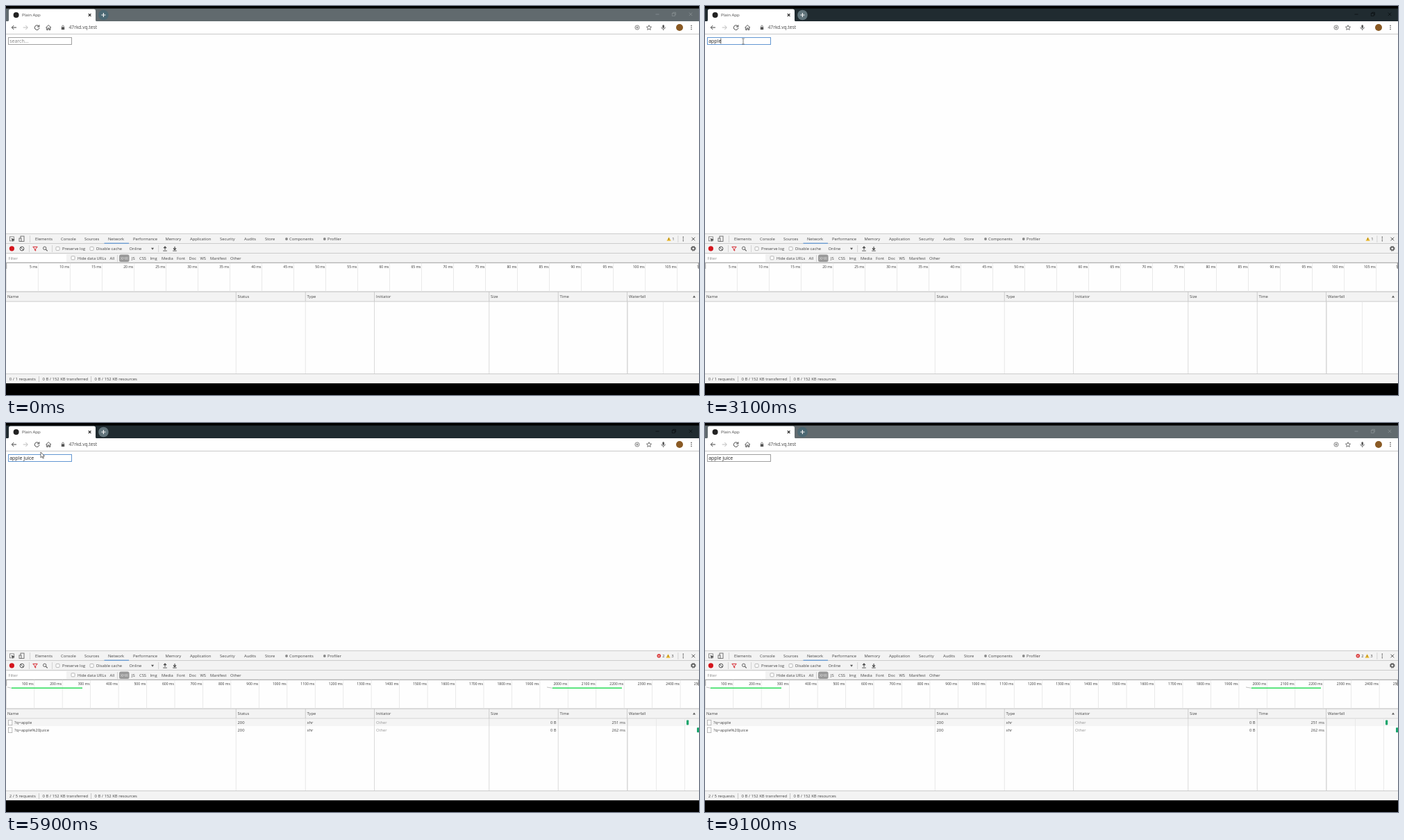
An HTML page for the animation above (9.8 s loop, 998 px wide and 561 px high).

```html
<!DOCTYPE html>
<html lang="en">
<head>
<meta charset="utf-8">
<title>Debounced search</title>
<style>
html, body { margin: 0; width: 100%; height: 100%; overflow: hidden; background: #000; }
svg { display: block; width: 100%; height: 100%; }
text { font: 5.8px "Open Sans", sans-serif; white-space: pre; }
</style>
</head>
<body>
<svg id="stage" viewBox="0 0 998 561"><g id="still"></g><g id="live"></g></svg>
<script>
const LOOP = 9800, STEP = 100, BLINK = 530;
const INK = '#444', PANEL = '#f3f3f3', BLUE = '#6397d2', GREEN = '#3ee068';

const rect = (x, y, w, h, fill, extra = '') =>
  `<rect x="${x}" y="${y}" width="${w}" height="${h}" fill="${fill}" ${extra}/>`;
const frame = (x, y, w, h, stroke, fill = '#fff', sw = 1, rx = 0) =>
  rect(x, y, w, h, fill, `stroke="${stroke}" stroke-width="${sw}" rx="${rx}"`);
const path = (d, stroke = INK, sw = 1, fill = 'none') =>
  `<path d="${d}" fill="${fill}" stroke="${stroke}" stroke-width="${sw}"/>`;
const disc = (x, y, r, fill, stroke = 'none', sw = 0.8) =>
  `<circle cx="${x}" cy="${y}" r="${r}" fill="${fill}" stroke="${stroke}" stroke-width="${sw}"/>`;
const esc = s => String(s).replace(/&/g, '&amp;').replace(/</g, '&lt;');
// y is the middle of the line
const text = (s, x, y, fill = INK, size = 5.8, anchor = 'start', style = '') =>
  `<text x="${x}" y="${y + 2.1}" fill="${fill}" text-anchor="${anchor}" style="font-size:${size}px;${style}">${esc(s)}</text>`;
const vline = (x, y1, y2, color = '#ccc', w = 0.8) => rect(x, y1, w, y2 - y1, color);
const hline = (y, color = '#ccc', h = 1) => rect(0, y, 998, h, color);
const cross = (x, y, r, color, sw = 1) =>
  path(`M${x - r} ${y - r}l${2 * r} ${2 * r}m0 ${-2 * r}l${-2 * r} ${2 * r}`, color, sw);
const dots = (x, y, gap) => [-gap, 0, gap].map(d => disc(x, y + d, 0.8, '#555')).join('');
const row = (y, items) => items.map(([s, x]) => text(s, x, y)).join('');
const checkbox = (x, y) => frame(x, y, 5, 5, '#aaa', '#fff', 0.8, 0.8);

const inputFont = '7px "Liberation Sans", Arial, sans-serif';
const pen = document.createElement('canvas').getContext('2d');
pen.font = inputFont;

function browserBar() {
  return rect(0, 22, 998, 19, '#fff') + hline(40, '#c9c9c9') +
    rect(0, 41, 998, 287, '#fefefe') +
    path('M15 31H8.5M11.3 28l-3 3l3 3', '#444') +
    path('M24.7 31h6.3M28.3 28l3 3l-3 3', '#bbb') +
    path('M47.3 29.2a3.3 3.3 0 1 0 .6 2.4M47.9 27.3v2.7h-2.8', '#444') +
    path('M57.3 31.3l3.9-3.7l3.9 3.7M58.7 30.5v4h1.6v-2.6h1.8v2.6h1.6v-4', '#444', 0.9) +
    rect(79.8, 30.3, 4.4, 3.8, '#555') + path('M80.7 30.5v-1.2a1.3 1.3 0 0 1 2.6 0v1.2', '#555', 0.7) +
    text('47rkd.vq.test', 90.5, 31, '#444', 6.7) +
    disc(909, 31, 3.1, 'none', '#666') + path('M907.4 31h3.2M909 29.4v3.2', '#666', 0.9) +
    path('M926 27.6l1 2.4l2.6.2l-2 1.7l.6 2.5l-2.2-1.4l-2.2 1.4l.6-2.5l-2-1.7l2.6-.2z', '#555', 0.8) +
    rect(945.4, 27.3, 2.6, 4.6, '#555', 'rx="1.3"') +
    path('M944 30.5a2.7 2.7 0 0 0 5.4 0M946.7 33.2v2', '#555', 0.8) +
    disc(970, 31, 5, '#8a5a24') + dots(987, 31, 2.6);
}

function devTabs() {
  const tabs = [['Elements', 42], ['Console', 79], ['Sources', 113], ['Network', 147],
    ['Performance', 183], ['Memory', 229.5], ['Application', 265], ['Security', 308],
    ['Audits', 343], ['Store', 373], ['Components', 408], ['Profiler', 463]];
  return rect(0, 328, 998, 42, PANEL) + hline(328) + hline(342) + hline(356) + hline(369.5) +
    frame(5.5, 332.8, 6, 6, '#777', 'none', 0.8) + path('M8 335.3l4.2 1.6l-1.9.6l-.7 1.9z', '#444', 0.5, '#444') +
    frame(21, 332, 5, 7.4, '#666', 'none', 0.9) + frame(19, 335, 3, 4.4, '#666', PANEL, 0.9) +
    vline(34, 331, 341) + row(336, tabs) + rect(141.5, 341.6, 35.5, 1.3, BLUE) +
    disc(404, 336, 1.9, '#888') + disc(458.8, 336, 1.9, '#888') +
    vline(967.5, 331, 341) + dots(975.3, 336, 2.6) + cross(989.8, 336, 2.3, '#555');
}

function devTools() {
  const kinds = [['Hide data URLs', 103], ['All', 149.5], ['JS', 181], ['CSS', 192], ['Img', 207.5],
    ['Media', 224], ['Font', 246], ['Doc', 263.5], ['WS', 279.5], ['Manifest', 294], ['Other', 323]];
  const arrow = (x, tip, dir) =>
    path(`M${x} ${tip}v${4.5 * dir}M${x - 2} ${tip + 2.2 * dir}l2 ${-2.2 * dir}l2 ${2.2 * dir}`, '#444', 1.1) +
    rect(x - 2.8, 352.6, 5.6, 0.9, '#444');
  return disc(8.4, 349.8, 3.6, '#d4141c') +
    disc(23, 350, 2.9, 'none', '#555', 1) + path('M21 348l4 4', '#555') +
    vline(33, 345, 355) + path('M38.8 347.3h6.4l-2.5 3v2.8l-1.4-1v-1.8z', '#d4141c', 0.9) +
    disc(55.7, 349.3, 2.2, 'none', '#555', 0.9) + path('M57.3 350.9l2.4 2.4', '#555', 1.1) +
    vline(66, 345, 355) + checkbox(72, 347.4) + checkbox(121, 347.4) +
    row(350, [['Preserve log', 81], ['Disable cache', 130], ['Online', 177.5]]) +
    path('M209 348.7h4l-2 3z', 'none', 0, '#555') + vline(219.3, 345, 355) +
    arrow(229, 347, 1) + arrow(243, 351.6, -1) +
    disc(989.8, 349.8, 2.3, 'none', '#555', 1.5) +
    `<circle cx="989.8" cy="349.8" r="3.4" fill="none" stroke="#555" stroke-width="1" stroke-dasharray="1.4 1.27"/>` +
    checkbox(94, 360.8) + row(363.8, kinds) + vline(160, 359, 369) +
    rect(163, 358.4, 14.5, 10.6, '#999', 'rx="2.5"') + text('XHR', 170.2, 363.8, '#e4e4e4', 5.6, 'middle');
}

function requestTable() {
  const heads = [['Name', 2], ['Status', 333.5], ['Type', 433.5], ['Initiator', 533],
    ['Size', 698], ['Time', 797.5], ['Waterfall', 897]];
  return rect(0, 370.5, 998, 160, '#fefefe') + rect(0, 412, 998, 14, PANEL) +
    hline(411.5, '#bbb') + hline(425.6) + row(419.2, heads) +
    path('M989 420.6h4l-2-3.2z', 'none', 0, '#555') +
    rect(0, 530, 998, 14.4, PANEL) + hline(530) + rect(0, 544.4, 998, 16.6, '#000');
}

function titleBar(active) {
  const bar = active ? '#202b30' : '#616a6e';
  const ctl = active ? '#0c1113' : '#858d90';
  return rect(0, 0, 998, 22, '#000') + rect(0, 3.6, 998, 18.4, bar) +
    path('M3 22.1q1-.2 1-1.5V6.8q0-2.3 2.5-2.3H126.5q2.5 0 2.5 2.3v13.8q0 1.3 1 1.5z', 'none', 0, '#fff') +
    disc(14.6, 13, 4, '#222') + text('Plain App', 23, 13, '#444', 6.1) + cross(120.6, 13, 1.8, '#222', 1.2) +
    disc(140.4, 13, 7.3, active ? '#61747b' : '#4b6873') +
    path('M137.3 13h6.2M140.4 9.9v6.2', '#f4f4f4', 1.2) +
    path('M935.5 12h5', ctl, 0.9) + frame(959.3, 10.5, 3.8, 3.8, ctl, 'none', 0.8) +
    path('M960.7 10.3V9.2h3.8v3.8h-1.2', ctl, 0.8) + cross(986, 11.8, 2.2, ctl, 0.9);
}

function overview(unit, gap, bars) {
  let s = '';
  for (let k = 1; k * gap < 1015; k++) {
    const x = k * gap;
    s += vline(x - 0.1, 370.6, 411.6, '#e4e4e4') + text(k * unit + ' ms', x - 0.8, 375.4, '#333', 5, 'end');
  }
  for (const [start, from, to] of bars)
    s += path(`M${start} 381L${from} 382.3`, '#bbb', 0.9) + rect(from, 381.4, to - from, 1.7, GREEN);
  return s + vline(0.2, 370.6, 379, '#999', 1) + vline(0.2, 379, 411.6, '#ddd') + vline(996.8, 370.6, 379, '#888', 1);
}

function request(i, name, ms, done, fill) {
  const y = 432 + i * 10.8;
  return rect(0, y - 5.2, 998, 10.6, fill) + frame(3.4, y - 3.6, 5.4, 7.4, '#aaa', '#fff', 0.8) +
    text(name, 12, y, INK, 6) + text(done ? '200' : '(pending)', 333.5, y, done ? INK : '#999') +
    text('xhr', 433.5, y) + text('Other', 533, y, '#999') +
    text('0 B', 792.5, y, INK, 5.8, 'end') + text(done ? ms + ' ms' : 'Pending', 892, y, INK, 5.8, 'end');
}

function network(t, hover) {
  const count = t >= 5600 ? 2 : t >= 3600 ? 1 : 0;
  const stage = t >= 5800 ? 2 : t >= 4000 ? 1 : 0;
  const errors = t >= 5800 ? 2 : t >= 3800 ? 1 : 0;
  const fill = i => hover === i ? '#eef4fb' : i ? '#fefefe' : '#f5f5f5';
  let s = overview(...[
    [5, 46.02, []],
    [20, 60.25, [[14, 67, 806]]],
    [100, 40.45, [[2, 8, 110], [779, 787, 887]]]
  ][stage]);
  if (stage === 1) s += rect(0, 380.6, 14, 0.8, '#ccc') + rect(805, 381.4, 7.5, 1.7, '#4aa0d8');
  if (count > 0) s += request(0, '?q=apple', 251, t >= 3800, fill(0));
  if (count > 1) s += request(1, '?q=apple%20juice', 262, t >= 5800, fill(1));
  for (const x of [[946], [943, 992], [936, 977]][stage]) s += vline(x, 426.6, 530, '#e6e6e6');
  for (const x of [331, 431, 530.2, 695.6, 795, 894.4])
    s += vline(x - 0.2, 412, 426, '#c4c4c4') + vline(x - 0.2, 426, 530, x < 500 ? '#e2e2e2' : '#d2d2d2', x > 890 ? 1.3 : 0.8);
  const bar = (x, i) => rect(x, 428.4 + i * 10.8, 3.2, 7, '#18a56c', 'rx="0.8"');
  if (stage === 1) s += bar(995, 0);
  if (stage === 2) s += bar(980, 0) + bar(995, 1);

  const wx = errors ? 953.6 : 954.6;
  s += path(`M${wx - 2.7} 338.4h5.4l-2.7-4.8z`, '#e3b32c', 0.5, '#f0bf34') + rect(wx - 0.3, 335, 0.7, 2.2, '#6b5200') +
    text(errors + 1, wx + 4.6, 336);
  if (errors) s += disc(940.3, 335.8, 2.8, '#d93a3a') + cross(940.3, 335.8, 1.1, '#fff', 0.7) + text(errors, 945.2, 336);

  return s + text(`${count} / ${1 + 2 * count} requests`, 4.8, 538, INK, 6) + vline(47, 534, 542, '#bbb') +
    text('0 B / 152 KB transferred', 52.6, 538, INK, 5.9) + vline(122, 534, 542, '#bbb') +
    text('0 B / 152 KB resources', 127.6, 538, INK, 5.9);
}

const PHRASE = 'apple juice';
const KEYS = [2600, 2800, 2900, 3000, 3100, 4600, 4700, 4800, 4900, 5000, 5100];
const caretOn = (t, since) => Math.floor((t - since + 50) / BLINK) % 2 === 0;

function fields(t) {
  const inFilter = t >= 200 && t < 1600, inSearch = t >= 1600 && t < 9000;
  const typed = PHRASE.slice(0, KEYS.filter(k => k <= t).length);
  const since = typed ? KEYS[typed.length - 1] : 1600;
  let s = frame(3.5, 45.5, 91, 10, inSearch ? BLUE : '#a0a0a0');
  s += text(typed || 'search...', 5.2, 50.4, typed ? '#222' : '#858585', 7, 'start', `font:${inputFont}`);
  if (inSearch && caretOn(t, since)) s += vline(5.4 + pen.measureText(typed).width, 46.5, 54.5, '#222', 0.7);
  s += rect(1, 358, 86, 11, '#fff');
  if (inFilter) s += frame(1.5, 358.5, 85, 10, BLUE);
  s += text('Filter', 3.4, 363.9, '#8a8a8a');
  if (inFilter && caretOn(t, 200)) s += vline(3, 360, 367.6, '#222', 0.7);
  return s;
}

// time, x, y
const TRAIL = [[200, 8, 300], [600, 46, 150], [900, 54, 64], [1000, 54, 60], [1100, 54, 60], [1400, 55, 51],
  [5600, 55, 51], [5900, 50, 42], [6200, 48, 100], [6600, 60, 330], [7000, 50, 436], [7400, 58, 443],
  [7600, 62, 444], [7800, 172, 445], [8100, 100, 445], [8300, 76, 446], [8600, 75, 445], [8700, 75, 445],
  [8800, 40, 441], [8900, 4, 434], [9000, 4, 434]];

function pointer(t) {
  const i = TRAIL.findIndex(p => p[0] > t);
  if (i < 1) return null;
  const [a, b] = [TRAIL[i - 1], TRAIL[i]];
  let u = (t - a[0]) / (b[0] - a[0]);
  u = u * u * (3 - 2 * u);
  return { x: a[1] + (b[1] - a[1]) * u, y: a[2] + (b[2] - a[2]) * u };
}

function drawPointer({ x, y }) {
  let shape;
  if (y > 45 && y < 56 && x < 94) shape = path('M-1.8-4h1.3l.5.4l.5-.4h1.3M0-3.6v7.2M-1.8 4h1.3l.5-.4l.5.4h1.3', '#444', 0.7);
  else if (y > 427 && x < 331)
    shape = path('M-1 .4q1-1.4 2 0v3.4l.4-.5q1-.5 1.4.4q1-.5 1.5.4q1.3-.4 1.4 1v3q0 1.2-.9 2.2v1.2h-4.6v-1.2l-2.9-3.7q-.2-1.3 1-1l.7.7z', '#222', 0.8, '#fff');
  else shape = path('M0 0v8l1.9-1.7l1.3 2.8l1.2-.6l-1.3-2.7h2.5z', '#333', 0.7, '#fff');
  return `<g transform="translate(${x} ${y})">${shape}</g>`;
}

const still = document.getElementById('still'), live = document.getElementById('live');
still.innerHTML = browserBar() + devTabs() + devTools() + requestTable();

function render(t) {
  const p = pointer(t);
  const hover = p && p.y > 427 ? (p.y < 437.5 ? 0 : 1) : -1;
  live.innerHTML = titleBar(t >= 200 && t < 9000) + network(t, hover) + fields(t) + (p ? drawPointer(p) : '');
}

let shown = -1;
const begin = performance.now();
function tick() {
  const t = Math.floor((performance.now() - begin) % LOOP / STEP) * STEP;
  if (t !== shown) render(shown = t);
  requestAnimationFrame(tick);
}
tick();
</script>
</body>
</html>
```
